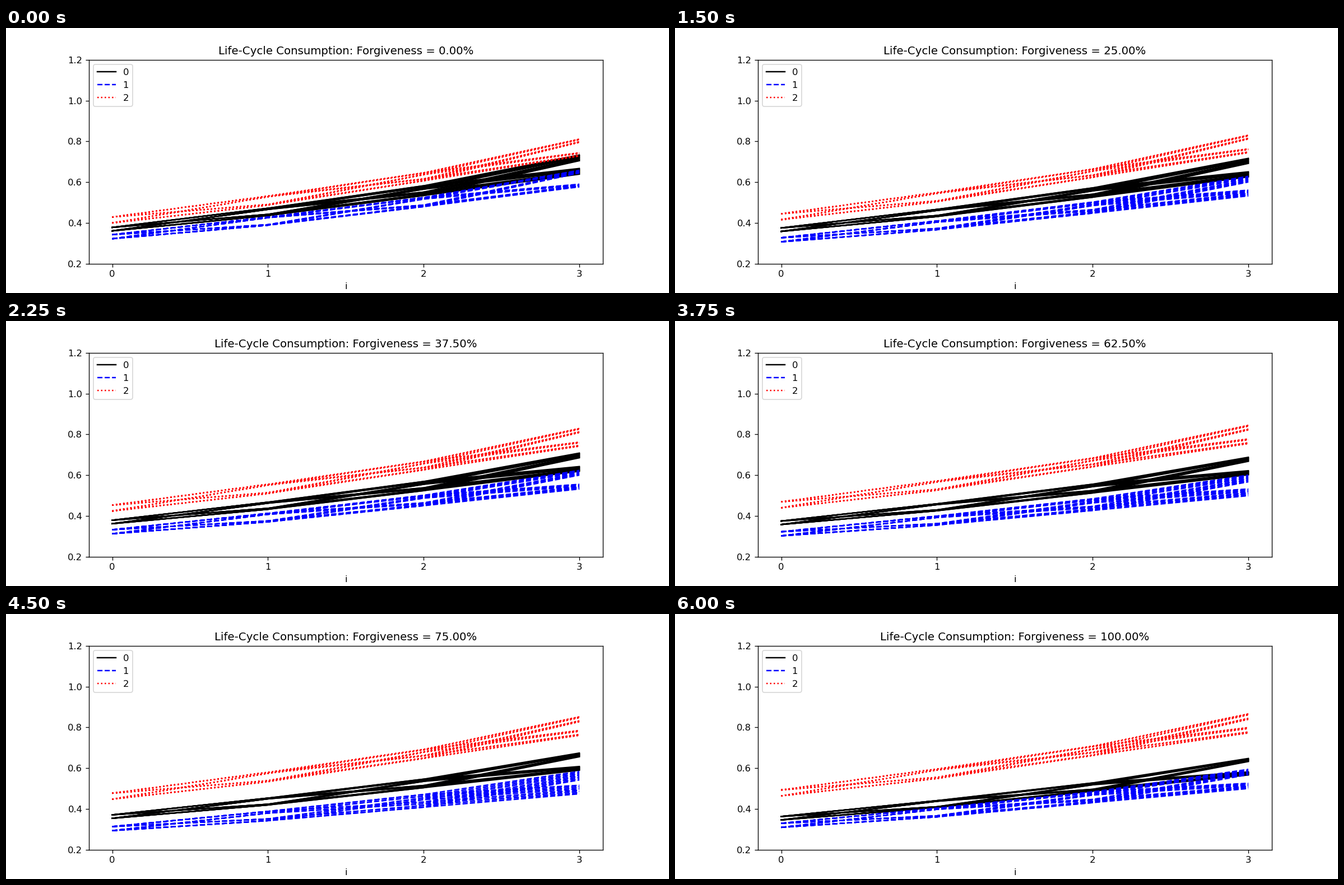
A matplotlib script for the animation above (6750 ms loop, 1183 px wide and 473 px high).

```python
import itertools

import matplotlib.pyplot as plt
import numpy as np
from matplotlib.animation import FuncAnimation

FRAMES, INTERVAL = 9, 750
AGES = np.arange(4)
# Every history of good (+) and bad (-) shocks over the four ages
HISTORIES = np.array(list(itertools.product([-0.5, 0.5], repeat=4)))
# How much past shocks matter at each age
MEMORY_GROWTH = [0, 0.2, 0.6, 1]

# level: key points (forgiveness share, mean consumption at age 0)
# gaps: distance between good and bad current shocks at each age
# spread: effect of past shocks at age 3, from share and level
# fade: weight of each older shock relative to the next one
COHORTS = [
    dict(style="k-", fade=0.5, gaps=[0.017, 0.030, 0.031, 0.066],
         level=[(0, 0.370), (0.125, 0.364), (0.375, 0.371), (0.625, 0.367), (1, 0.355)],
         spread=lambda share, level: 0.028 - 0.013 * share),
    dict(style="b--", fade=0.5, gaps=[0.020, 0.037, 0.037, 0.068],
         level=[(0, 0.333), (0.125, 0.313), (0.375, 0.323), (0.5, 0.322),
                (0.75, 0.304), (0.875, 0.327), (1, 0.320)],
         spread=lambda share, level: 0.346 - level),
    dict(style="r:", fade=0.2, gaps=[0.029, 0.041, 0.030, 0.067],
         level=[(0, 0.415), (1, 0.479)],
         spread=lambda share, level: 0.016 + 0.011 * share),
]
# Consumption growth per age, shared by all cohorts
GROWTH = [(0, 0.206), (0.125, 0.208), (0.375, 0.194), (1, 0.179)]


def at(share, points):
    return np.interp(share, *zip(*points))


def consumption(cohort, share):
    """Consumption by history (rows) and age (columns)."""
    level = at(share, cohort["level"])
    spread = cohort["spread"](share, level)
    means = level * np.exp(at(share, GROWTH) * AGES)
    paths = means + HISTORIES * cohort["gaps"]
    for age in AGES[1:]:
        weights = cohort["fade"] ** np.arange(age)[::-1]
        past = HISTORIES[:, :age] @ weights / weights.sum()
        paths[:, age] += spread * MEMORY_GROWTH[age] * past
    return paths


fig, ax = plt.subplots(figsize=(10, 3.9985), dpi=118.3)
lines = []
for number, cohort in enumerate(COHORTS):
    group = [ax.plot(AGES, np.ones(4), cohort["style"])[0] for _ in HISTORIES]
    group[0].set_label(str(number))
    lines.append(group)
ax.set_xlim(-0.15, 3.15)
ax.set_ylim(0.2, 1.2)
ax.set_xticks(AGES)
ax.set_xlabel("i")
ax.legend(loc="upper left")
title = ax.set_title("")


def draw(frame):
    share = frame / (FRAMES - 1)
    title.set_text(f"Life-Cycle Consumption: Forgiveness = {share:.2%}")
    for cohort, group in zip(COHORTS, lines):
        for line, path in zip(group, consumption(cohort, share)):
            line.set_ydata(path)
    return [title, *itertools.chain(*lines)]


anim = FuncAnimation(fig, draw, frames=FRAMES, interval=INTERVAL, repeat=True,
                     repeat_delay=0)
plt.show()
```
